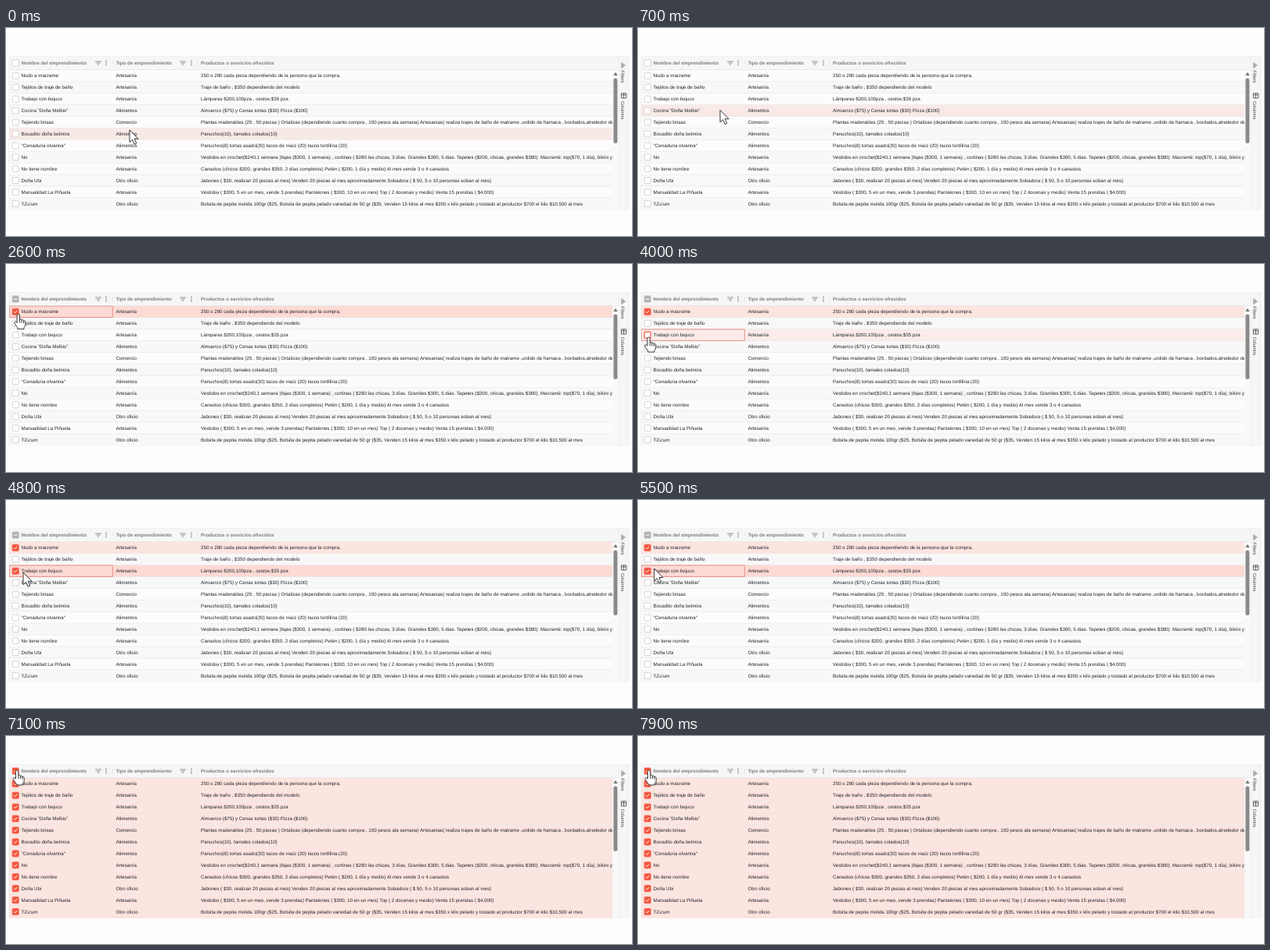
These frames come from a looping animation (800x267 px, 8 s). An HTML page:

```html
<!DOCTYPE html>
<html lang="es">
<head>
<meta charset="utf-8">
<title>Selección de filas</title>
<style>
  html, body { margin: 0; width: 100%; height: 100%; overflow: hidden; background: #fdfdfd; }
  svg { display: block; width: 100vw; height: 100vh; }
  text {
    font: 6.195px "Liberation Sans", Arial, sans-serif;
    fill: #22242c;
    white-space: pre;
    text-rendering: geometricPrecision;
  }
  .head { font-size: 6.17px; font-weight: bold; fill: #7c7c7c; }
  .side { font-size: 6px; fill: #444; }
  .line { stroke: #e6e6e6; stroke-width: .6; fill: none; }
  .icon { stroke: #777; stroke-width: .8; fill: none; }
  .dark { stroke: #444; }
  .box { fill: #fff; stroke: #c9c9c9; stroke-width: .8; }
  .mark { fill: none; stroke: #fff; stroke-width: 1; }
  .tint { fill: none; }
  .hover .tint { fill: rgba(244, 82, 63, .09); }
  .on .tint { fill: #fce4df; }
  .on.hover .tint { fill: #fddad4; }
  .on .box { fill: #f4563f; stroke: #f4563f; }
  .dash .box { fill: #b3b3b3; stroke: #b3b3b3; }
  .tick, .bar { visibility: hidden; }
  .on .tick, .dash .bar { visibility: visible; }
  .active .box { stroke: #f4563f; stroke-width: 1.2; }
  #focus { fill: none; stroke: #e2796d; stroke-width: .8; }
  #cursor path { fill: #fff; stroke: #222; stroke-width: .9; stroke-linejoin: round; }
</style>
</head>
<body>
<svg viewBox="0 0 800 267" preserveAspectRatio="none">
  <defs>
    <clipPath id="cells"><rect x="4" y="36" width="771" height="198"/></clipPath>
  </defs>
  <rect x="4" y="36.5" width="792" height="197.5" fill="#f6f6f6"/>
  <g id="rows" clip-path="url(#cells)"></g>
  <g id="header"></g>
  <rect id="focus" x="4.4" width="131.8" height="14.4"/>

  <path class="line" d="M4 36.8H796M4 53.5H783M4 36.8V234M796 36.8V234M783 36.8V234M136.5 41V49M244.5 41V49"/>
  <rect x="775.5" y="54" width="7.2" height="180" fill="#f9f9f9"/>
  <path d="M776.3 61 779 56.8 781.7 61Z" fill="#777"/>
  <rect x="776.4" y="64.5" width="5" height="83.5" rx="2.5" fill="#8a8a8a"/>

  <path class="icon dark" d="M787 44.5V51.5M789 45.5V50.5M791 47.2V48.8"/>
  <path class="icon dark" d="M786.3 83.8H792.7V90H786.3ZM786.3 85.9H792.7M789.5 83.8V90"/>
  <text class="side" transform="translate(786.3 54.2) rotate(90)">Filters</text>
  <text class="side" transform="translate(786.3 93.7) rotate(90)">Columns</text>

  <g id="cursor">
    <path id="arrow" d="M0 0V15.6L3.5 12.3 6.1 18.2 8.7 17 6.2 11.3H11.1Z"/>
    <path id="hand" d="M-1.7 11V1.6A1.65 1.65 0 0 1 1.6 1.6V7.2Q2 6.1 3.1 6.3 4.2 6.5 4.2 8 4.7 6.9 5.7 7.2 6.7 7.5 6.7 8.9 7.3 8 8.2 8.5 9 9 9 10.2V13.4Q8.8 15.4 7.2 17V19H-1V17.2Q-3.2 14.9-4.9 11.8-5.4 10.2-4.1 9.8-3 9.6-1.7 11ZM1.6 7.2V11M4.2 8V11.3M6.7 8.9V11.6"/>
  </g>
</svg>
<script>
const TOP = 53.7, PITCH = 14.94, LOOP = 8000, STEP = 100;
const $ = id => document.getElementById(id);

const data = [
  ["Nudo a macrame", "Artesanía", "250 o 280 cada pieza dependiendo de la persona que la compra."],
  ["Tejidos de traje de baño", "Artesanía", "Traje de baño , $350 dependiendo del modelo"],
  ["Trabajo con bejuco", "Artesanía", "Lámparas $200,100pza , cestos.$35 pza"],
  ['Cocina "Doña Melbis"', "Alimentos", "Almuerzo ($75) y Cenas tortas ($30) Pizza ($100)"],
  ["Tejiendo brisas", "Comercio", "Plantas maderables (25 , 50 piezas ) Ortalizas (dependiendo cuanto compra , 100 pesos ala semana) Artesanias( realiza trajes de baño de matrame ,urdido de hamaca , bordados,alrededor de"],
  ["Bocadito doña belmira", "Alimentos", "Panuchos(10), tamales colados(10)"],
  ['"Cenaduria olvarina"', "Alimentos", "Panuchos(8) tortas asado(20) tacos de maíz (20) tacos tortillina (20)"],
  ["No", "Artesanía", "Vestidos en crochet($240,1 semana )fajas ($300, 1 semana) , cortinas ( $280 las chicas, 3 días. Grandes $300, 5 dias. Tapetes ($200, chicas, grandes $380). Macramé: top($70, 1 día), bikini y"],
  ["No tiene nombre", "Artesanía", "Canastos (chicos $300, grandes $350, 2 días completos) Petén ( $200, 1 día y medio) Al mes vende 3 o 4 canastos"],
  ["Doña Ubi", "Otro oficio", "Jabones ( $30, realizan 20 piezas al mes) Venden 20 piezas al mes aproximadamente Sobadora ( $ 50, 5 o 10 personas soban al mes)"],
  ["Manualidad La Piñuela", "Artesanía", "Vestidos ( $300, 5 en un mes, vende 3 prendas) Pantalones ( $300, 10 en un mes) Top ( 2 docenas y medio) Venta 15 prendas ( $4,000)"],
  ["TZu'um", "Otro oficio", "Bolsita de pepita molida 100gr ($25, Bolsita de pepita pelado variedad de 50 gr ($35, Venden 15 kilos al mes $350 x kilo pelado y tostado al productor $700 el kilo $10,500 al mes"]
];
const columns = [19.6, 140.4, 249];

const checkbox = y => `
  <rect class="box" x="8.2" y="${y - 4}" width="8" height="8" rx="1"/>
  <path class="mark tick" d="M10.2 ${y}l1.4 1.5 2.7-3"/>
  <path class="mark bar" d="M9.8 ${y}h4.8"/>`;

const labels = (texts, y, kind = "") => texts.map((s, i) =>
  `<text class="${kind}" x="${columns[i]}" y="${y + 2.2}">${s}</text>`).join("");

const menu = (filterX, dotsX) => `
  <path class="icon" d="M${filterX - 4} 43h8m-6.5 2.1h5m-3.6 2.1h2.2"/>
  <g fill="#666">${[42.6, 45, 47.4].map(y => `<circle cx="${dotsX}" cy="${y}" r=".75"/>`).join("")}</g>`;

$("header").innerHTML = checkbox(45)
  + labels(["Nombre del emprendimiento", "Tipo de emprendimiento", "Productos o servicios ofrecidos"], 45, "head")
  + menu(118, 128) + menu(226, 237);

// Each row reaches a little under the next, so the last one fills the bottom edge
$("rows").innerHTML = data.map((texts, i) => {
  const y = TOP + i * PITCH, mid = y + PITCH / 2 + .1;
  const area = `x="4" y="${y}" width="772" height="${PITCH + 1}"`;
  return `<g><rect ${area} fill="${i % 2 ? "#f8f8f8" : "#fcfcfc"}"/><rect class="tint" ${area}/>
    <path class="line" d="M4 ${y}H776"/>${checkbox(mid)}${labels(texts, mid)}</g>`;
}).join("");
const rows = [...$("rows").children];

// Cursor stops: time, x, y
const stops = [
  [0, 158, 131], [200, 158, 131], [1400, 17, 63], [1900, 17, 63],
  [2200, 15.8, 64.4], [3000, 15.8, 64.4], [3700, 13.7, 94], [4300, 13.7, 94],
  [4800, 22, 93], [5300, 22, 93], [6200, 12.3, 55], [6300, 12.3, 55],
  [6700, 14.2, 43.9], [LOOP, 14.2, 43.9]
];

function cursorAt(t) {
  const n = stops.findIndex(s => s[0] > t);
  const [t0, x0, y0] = stops[n - 1], [t1, x1, y1] = stops[n];
  const p = (t - t0) / (t1 - t0), e = p * p * (3 - 2 * p);
  return [x0 + (x1 - x0) * e, y0 + (y1 - y0) * e];
}

function draw(t) {
  const [x, y] = cursorAt(t);
  const over = Math.floor((y - TOP) / PITCH);
  const all = t >= 7000;
  const middle = over < 0 ? 45 : TOP + (over + .5) * PITCH;
  const onBox = Math.abs(x - 12.2) < 4.3 && Math.abs(y - middle) < 4.5;
  const focus = t >= 2300 && t < 4000 ? 0 : t >= 4000 && !all ? 2 : -1;

  rows.forEach((row, i) => {
    const on = all || (i === 0 && t >= 2400) || (i === 2 && t >= 4200);
    row.classList.toggle("on", on);
    row.classList.toggle("hover", i === over);
    row.classList.toggle("active", i === focus && !on);
  });
  $("header").setAttribute("class", all ? "on" : t >= 2400 ? "dash" : "");
  $("focus").style.visibility = focus < 0 ? "hidden" : "visible";
  $("focus").setAttribute("y", TOP + Math.max(focus, 0) * PITCH + .3);
  $("cursor").setAttribute("transform", `translate(${x} ${y})`);
  $("arrow").style.display = onBox ? "none" : "";
  $("hand").style.display = onBox ? "" : "none";
}

const start = performance.now();
function tick() {
  const t = (performance.now() - start) % LOOP;
  draw(Math.floor(t / STEP) * STEP);
  requestAnimationFrame(tick);
}
tick();
</script>
</body>
</html>
```
